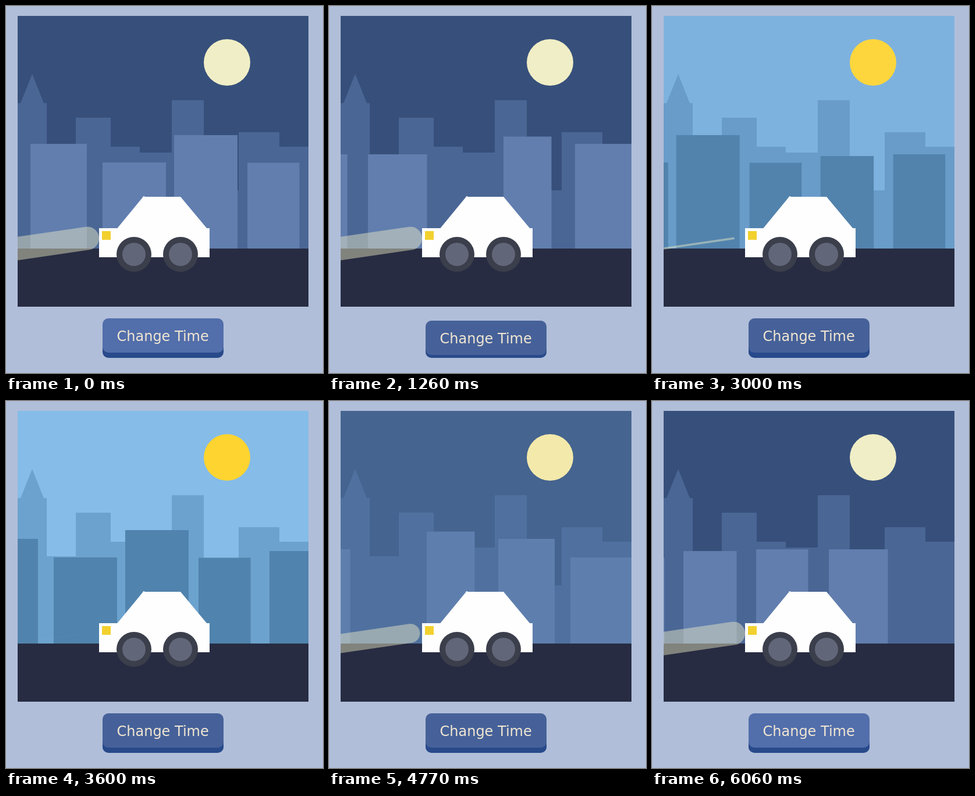
Write an HTML page that moves like this. It is 545x631 px and loops after 6090 ms.

```html
<!DOCTYPE html>
<html lang="en">
<head>
<meta charset="utf-8">
<title>Night drive</title>
<style>
  html, body { margin: 0; width: 100%; height: 100%; overflow: hidden; background: #b1bed9; }
  svg { display: block; }
  text { font: 24px "DejaVu Sans", Verdana, sans-serif; }
</style>
</head>
<body>
<svg width="545" height="631" viewBox="0 0 545 631">
  <clipPath id="frame"><rect x="20" y="17" width="500" height="500"/></clipPath>
  <g clip-path="url(#frame)">
    <rect id="sky" x="20" y="17" width="500" height="500"/>
    <circle id="moon" cx="380" cy="97" r="40"/>
    <path id="skyline" d="M20 417V167H25L45 117L65 167H70V267H120V192H180V242H230V252H285V162H340V317H400V217H470V242H520V417Z"/>
    <g id="near"></g>
    <rect x="20" y="417" width="500" height="100" fill="#272c42"/>
    <path id="beam" d="M140 399.5L-100 434.5" stroke="#f0eec6" stroke-opacity=".45" stroke-linecap="round"/>
    <g fill="#fefefe">
      <rect x="160" y="382" width="190" height="50"/>
      <path d="M191 382.5L235 329V328L237 327L239 328H300L345.5 382.5Z"/>
    </g>
    <rect x="165" y="387" width="15" height="15" fill="#f2d12e"/>
    <g fill="#3b3e4b"><circle cx="220" cy="427" r="30"/><circle cx="300" cy="427" r="30"/></g>
    <g fill="#626679"><circle cx="220" cy="427" r="20"/><circle cx="300" cy="427" r="20"/></g>
  </g>
  <rect x="166" y="546" width="208" height="59" rx="10" fill="#284a8b"/>
  <g id="button">
    <rect id="face" x="166" y="537" width="208" height="59" rx="10"/>
    <text x="190.5" y="576" fill="#f0e6d2">Change Time</text>
  </g>
</svg>
<script>
const LOOP = 6090, STEP = 30, FADE = 2000;
const DAY_CLICK = 1730, NIGHT_CLICK = 3735;
const PRESSES = [[1170, DAY_CLICK], [3640, NIGHT_CLICK]];
const HOVER = [900, 5400];

// Near row: left edge, width, top; the row repeats every PERIOD pixels.
const PERIOD = 1101;
const BUILDINGS = [
  [415, 89.5, 269.5], [289, 109, 222], [166, 109, 269], [42, 97, 237],
  [-81, 82.5, 224.5], [-314, 101.5, 255], [-439, 89.5, 255], [-564, 91.5, 258]
];
// Time in ms, distance travelled in px.
const TRAVEL = [[0, 0], [600, 177], [1260, 381], [2340, 674], [3600, 1017], [4770, 1350], [6090, 1727.6]];

// Night and day colours.
const COLORS = {
  sky: [[55, 80, 123], [133, 188, 232]],
  moon: [[240, 238, 198], [254, 212, 48]],
  skyline: [[74, 102, 149], [108, 162, 206]],
  near: [[97, 126, 174], [80, 131, 173]]
};

const $ = id => document.getElementById(id);
const lerp = (a, b, k) => a + (b - a) * k;
const within = (t, [from, to]) => t >= from && t < to;

const rects = BUILDINGS.map(([, width, top]) => {
  const r = document.createElementNS("http://www.w3.org/2000/svg", "rect");
  r.setAttribute("y", top);
  r.setAttribute("width", width);
  r.setAttribute("height", 417 - top);
  $("near").append(r);
  return r;
});

// CSS "ease": cubic-bezier(.25, .1, .25, 1)
function ease(x) {
  if (x <= 0) return 0;
  if (x >= 1) return 1;
  const curve = (a, b, s) => 3 * (1 - s) ** 2 * s * a + 3 * (1 - s) * s * s * b + s ** 3;
  let lo = 0, hi = 1;
  for (let i = 0; i < 24; i++) {
    const mid = (lo + hi) / 2;
    if (curve(.25, .25, mid) < x) lo = mid; else hi = mid;
  }
  return curve(.1, 1, lo);
}

function distance(t) {
  const i = TRAVEL.findIndex(([time]) => time > t);
  const [t0, d0] = TRAVEL[i - 1], [t1, d1] = TRAVEL[i];
  return lerp(d0, d1, (t - t0) / (t1 - t0));
}

function draw(t) {
  const day = t < NIGHT_CLICK ? ease((t - DAY_CLICK) / FADE) : 1 - ease((t - NIGHT_CLICK) / FADE);
  for (const [id, [night, noon]] of Object.entries(COLORS)) {
    $(id).setAttribute("fill", `rgb(${night.map((c, i) => Math.round(lerp(c, noon[i], day)))})`);
  }
  $("beam").setAttribute("stroke-width", 40 * (1 - day));

  const d = distance(t);
  rects.forEach((r, i) => r.setAttribute("x", (BUILDINGS[i][0] + d + 150 + PERIOD) % PERIOD - 150));

  const pressed = PRESSES.some(p => within(t, p));
  $("button").setAttribute("transform", `translate(0 ${pressed ? 4 : 0})`);
  $("face").setAttribute("fill", within(t, HOVER) ? "#466199" : "#526eab");
}

const start = performance.now();
function tick() {
  const t = (performance.now() - start) % LOOP;
  draw(Math.floor(t / STEP) * STEP);
  requestAnimationFrame(tick);
}
tick();
</script>
</body>
</html>
```
